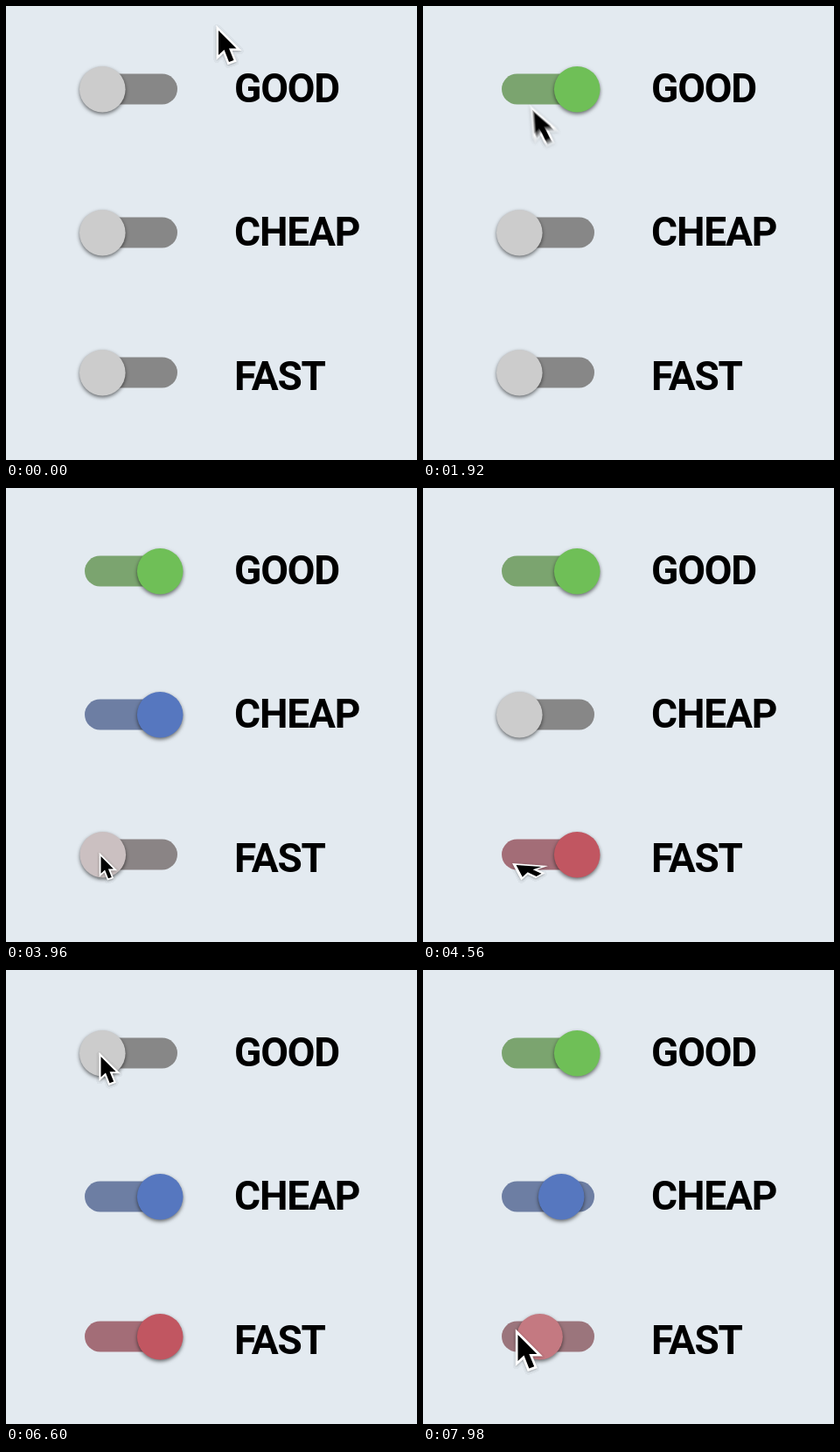
Animation, 470 px wide and 519 px high, one loop 8000 ms. Source, as an HTML page with a canvas:

```html
<!DOCTYPE html>
<html lang="en">
<head>
<meta charset="utf-8">
<title>Pick two</title>
<style>
  html, body { margin: 0; width: 100%; height: 100%; overflow: hidden; background: #e3eaf0; }
  canvas { display: block; }
</style>
</head>
<body>
<canvas id="stage" width="470" height="519"></canvas>
<script>
const W = 470, H = 519, LOOP = 8000, STEP = 60;
const ctx = document.getElementById('stage').getContext('2d');

function makeLayer() {
  const layer = document.createElement('canvas');
  layer.width = W;
  layer.height = H;
  return layer.getContext('2d');
}
const stamp = makeLayer(), blur = makeLayer();

const KNOB_OFF = [204, 204, 204], TRACK_OFF = [135, 135, 135];
const switches = [
  { label: 'GOOD', y: 95.2, base: 110, knob: [111, 191, 87], track: [123, 164, 111] },
  { label: 'CHEAP', y: 259.2, base: 274, knob: [86, 119, 191], track: [109, 126, 163] },
  { label: 'FAST', y: 419.2, base: 439, knob: [193, 86, 97], track: [163, 109, 119] }
];

// time, switch turned on, switch forced off
const clicks = [
  [1410, 0], [2685, 1], [3930, 2, 1], [5620, 1, 0], [6690, 0, 2], [7770, 2, 1]
];
const TOGGLE = 500, OFF_DELAY = 25, TINT = 0.6;

// start, end, target x, target y, sideways bulge
const START = { x: 243, y: 28 };
const moves = [
  [330, 1120, 108.5, 95, 0],
  [1725, 2425, 108.5, 260, 38],
  [2962, 3662, 108.5, 421, 38],
  [4800, 5500, 108.5, 260, 0],
  [5830, 6530, 108.5, 99, 0],
  [6920, 7640, 108.5, 417, 38]
];
const SHUTTER = 24, SAMPLES = 8;

const clamp = v => Math.max(0, Math.min(1, v));
const span = (t, a, b) => clamp((t - a) / (b - a));
const lerp = (a, b, k) => a + (b - a) * k;
const ease = p => p < 0.5 ? 2 * p * p : 1 - 2 * (1 - p) ** 2;
const smooth = p => p * p * (3 - 2 * p);
const mix = (a, b, k) => `rgb(${a.map((v, i) => Math.round(lerp(v, b[i], k)))})`;

function switchState(index, t) {
  let state = { slide: 0, tint: 0 };
  for (const [time, on, off] of clicks) {
    const turnsOn = on === index;
    const begin = turnsOn ? time : time + OFF_DELAY;
    if ((!turnsOn && off !== index) || t < begin) continue;
    const p = clamp((t - begin) / TOGGLE);
    const q = turnsOn ? p : 1 - p;
    state = { slide: ease(q), tint: clamp(q / TINT) };
  }
  return state;
}

function pointerAt(t) {
  let { x, y } = START;
  for (const [a, b, tx, ty, bulge] of moves) {
    if (t < a) break;
    const e = ease(span(t, a, b));
    x = lerp(x, tx, e) + bulge * Math.sin(Math.PI * e);
    y = lerp(y, ty, e);
  }
  return { x, y };
}

function pressScale(t) {
  for (const [time] of clicks) {
    const d = t - time;
    if (d < -140 || d > 400) continue;
    if (d < 0) return lerp(1, 0.68, span(d, -140, -40));
    if (d < 200) return lerp(0.68, 1.07, smooth(d / 200));
    return lerp(1.07, 1, smooth((d - 200) / 200));
  }
  return 1;
}

// Crouch before leaping back up
const crouch = t => smooth(span(t, 4300, 4560)) * (1 - smooth(span(t, 4560, 4820)));

function drawSwitch(item, state) {
  ctx.fillStyle = mix(TRACK_OFF, item.track, state.tint);
  ctx.beginPath();
  ctx.roundRect(90, item.y - 17.7, 106, 35, 17.5);
  ctx.fill();

  ctx.save();
  ctx.shadowColor = 'rgba(0,0,0,.55)';
  ctx.shadowBlur = 4;
  ctx.shadowOffsetY = 2;
  ctx.fillStyle = mix(KNOB_OFF, item.knob, state.tint);
  ctx.beginPath();
  ctx.arc(lerp(110.3, 176.2, state.slide), item.y, 26.3, 0, Math.PI * 2);
  ctx.fill();
  ctx.restore();

  ctx.fillStyle = '#000';
  ctx.fillText(item.label, 261, item.base);
}

const arrow = new Path2D('M0 0V28L6.5 22L12 36L17.5 34L12 20.5H20.5Z');

function stampArrow({ x, y }, tilt, size, squash) {
  stamp.clearRect(0, 0, W, H);
  stamp.save();
  stamp.translate(x - 2 * squash, y + 10 * squash);
  stamp.rotate(tilt);
  stamp.scale(size, size);
  stamp.transform(lerp(1, 1.15, squash), -0.39 * squash, 0.26 * squash, lerp(1, 0.49, squash), 0, 0);
  stamp.strokeStyle = '#fff';
  stamp.lineWidth = 5;
  stamp.shadowColor = 'rgba(0,0,0,.3)';
  stamp.shadowBlur = 3;
  stamp.shadowOffsetY = 1;
  stamp.stroke(arrow);
  stamp.shadowColor = 'transparent';
  stamp.fill(arrow);
  stamp.restore();
}

// Averages several exposures while the pointer moves
function drawPointer(t) {
  const before = pointerAt(t - SHUTTER / 2), after = pointerAt(t + SHUTTER / 2);
  const tilt = -0.28 * (after.y - before.y) / SHUTTER;
  const size = pressScale(t), squash = crouch(t);

  blur.clearRect(0, 0, W, H);
  blur.globalCompositeOperation = 'lighter';
  blur.globalAlpha = 1 / SAMPLES;
  for (let i = 0; i < SAMPLES; i++) {
    const at = t + SHUTTER * ((i + 0.5) / SAMPLES - 0.5);
    stampArrow(pointerAt(at), tilt, size, squash);
    blur.drawImage(stamp.canvas, 0, 0);
  }
  ctx.drawImage(blur.canvas, 0, 0);
}

function render(t) {
  ctx.fillStyle = '#e3eaf0';
  ctx.fillRect(0, 0, W, H);
  ctx.font = 'bold 46px Roboto, "Open Sans", sans-serif';
  ctx.letterSpacing = '-1.2px';
  switches.forEach((item, i) => drawSwitch(item, switchState(i, t)));
  drawPointer(t);
}

const origin = performance.now();
function tick() {
  const t = (performance.now() - origin) % LOOP;
  render(Math.floor(t / STEP) * STEP);
  requestAnimationFrame(tick);
}
tick();
</script>
</body>
</html>
```
